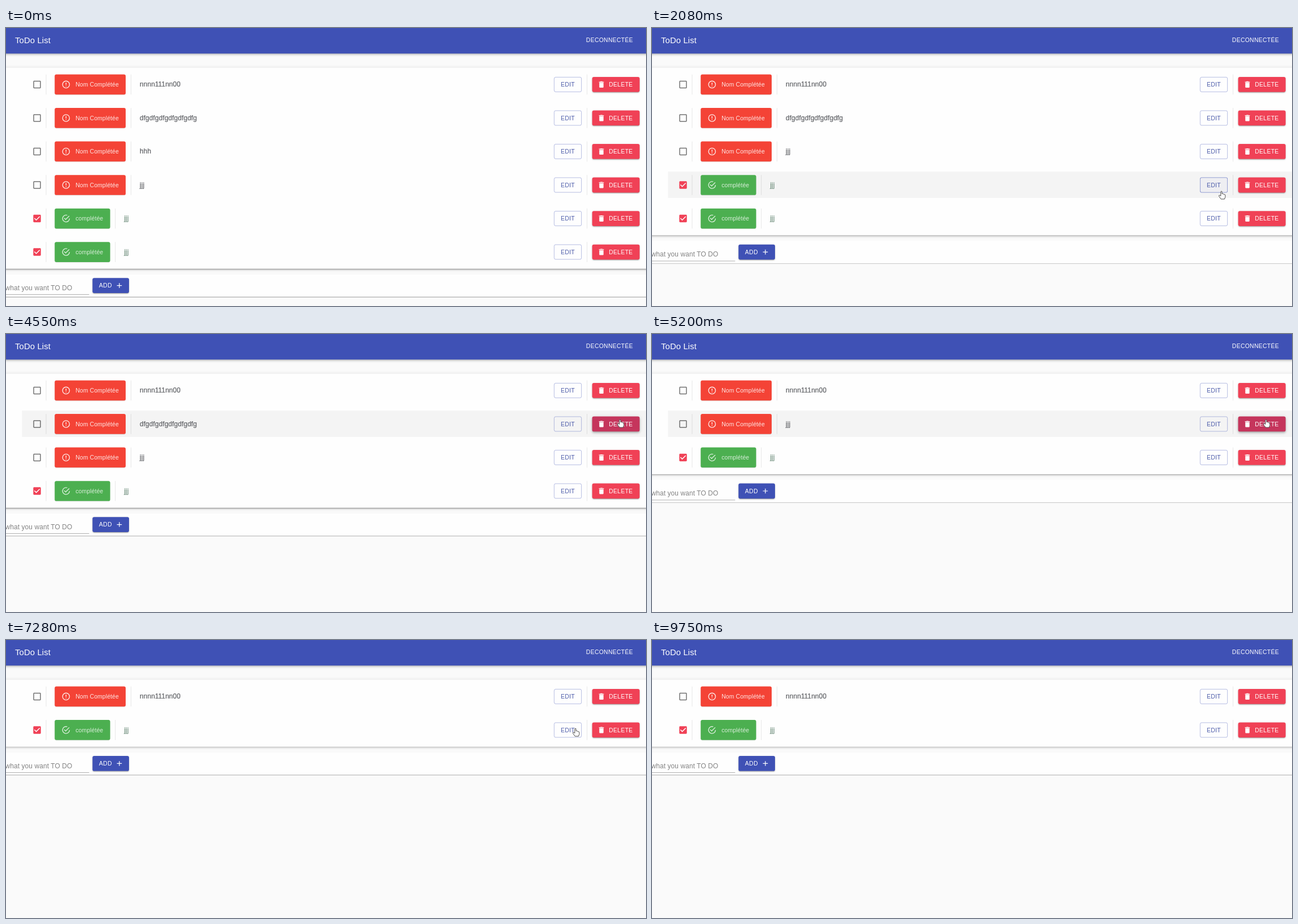
Recreate the animation shown at these times as an HTML page. Size 1134 by 494 pixels, loop 9.88 s.

```html
<!DOCTYPE html>
<html lang="fr">
<head>
<meta charset="utf-8">
<title>ToDo List</title>
<style>
  html, body { margin: 0; width: 100%; height: 100%; overflow: hidden; background: #fafafa; }
  #stage { position: relative; width: 1134px; height: 494px; overflow: hidden; background: #fafafa; }
  #page {
    position: absolute; left: 0; top: 0; width: 1525px; height: 664px;
    transform: scale(.744); transform-origin: 0 0;
    font: 16px "Liberation Sans", Arial, sans-serif; letter-spacing: .15px;
  }
  #page * { box-sizing: border-box; white-space: nowrap; }
  svg { display: block; fill: currentColor; flex: none; }
  header {
    position: absolute; left: -10px; right: -10px; top: -3.5px; height: 64px; z-index: 2;
    background: #3f51b5; color: #fff; line-height: 64px;
    box-shadow: 0 2px 4px -1px #0003, 0 4px 5px #00000024, 0 1px 10px #0000001f;
  }
  header * { position: absolute; top: 0; }
  header b { left: 31.5px; font-size: 20px; font-weight: 400; }
  header span { left: 1391.5px; font-size: 14px; letter-spacing: .4px; }
  main { position: absolute; top: 94.8px; left: 0; width: 1525px; }
  .paper { position: relative; margin: 0 -10px; padding: 0 10px; background: #fefefe; }
  #list { box-shadow: 0 3px 3px -2px #0004, 0 3px 4px #0000002b, 0 1px 8px #0000001f; }
  .row { position: relative; height: 80px; }
  .row > * { position: absolute; }
  .band { left: 37.6px; right: -10px; top: 8.3px; height: 63.2px; overflow: hidden; }
  .hover .back { background: #0000000a; }
  .ripple { position: absolute; border-radius: 50%; background: #0000001a; transform: translate(-50%, -50%); }
  .check { left: 61.9px; top: 28px; color: #0000008f; }
  .done .check { color: #f04156; }
  .rule { width: 1px; height: 48px; top: 16px; background: #0000001f; }
  .tag {
    left: 115.6px; top: 16px; height: 48px; padding: 0 16px; display: flex; align-items: center; gap: 12px;
    border-radius: 4px; background: #f44336; color: #ffffffde; font-size: 14px;
    box-shadow: 0 1px 1px #0002;
  }
  .done .tag { background: #4caf50; color: #ffffffc8; }
  .tag + .rule { left: 297.4px; }
  .done .tag + .rule { left: 260.4px; }
  .label { left: 318.5px; top: 0; line-height: 79px; color: #5f6165; -webkit-text-stroke: .3px #5f6165; }
  .done .label { left: 281.2px; color: #71907f; -webkit-text-stroke-color: #71907f; }
  .btn {
    position: absolute; display: flex; align-items: center; gap: 8px; height: 36px; padding: 0 16px;
    border-radius: 4px; color: #fff; font-size: 14px; letter-spacing: .4px;
    box-shadow: 0 3px 1px -2px #0003, 0 2px 2px #00000024, 0 1px 5px #0000001f;
  }
  .row .btn { top: 22.3px; }
  .edit { left: 1305.1px; color: #4c5ba9; border: 1px solid #3f51b580; padding: 0 15px; box-shadow: none; }
  .edit.over { background: #3f51b508; border-color: #3f51b5b0; }
  .del { left: 1395.8px; padding-left: 12px; background: #f04156; }
  .del.over { background: #c5355c; box-shadow: 0 2px 4px -1px #0003, 0 4px 5px #00000024, 0 1px 10px #0000001f; }
  #form { margin-top: 13.4px; height: 53.7px; box-shadow: 0 2px 1px -1px #0004, 0 1px 1px #0003, 0 1px 3px #0000001f; }
  #form .hint { position: absolute; left: 8px; top: 24px; color: #0000007c; }
  #form .line { position: absolute; left: 0; top: 47.8px; width: 207.6px; height: 1px; background: #0000006b; }
  #form .btn { left: 215.6px; top: 8.9px; padding-right: 13px; background: #3f51b5; }
  #cursor { position: absolute; left: 0; top: 0; overflow: visible; fill: #fff; stroke: #4a4a4a; }
</style>
</head>
<body>
<div id="stage">
  <div id="page">
    <header><b>ToDo List</b><span>DECONNECTÉE</span></header>
    <main>
      <div class="paper" id="list"></div>
      <div class="paper" id="form">
        <span class="hint">what you want TO DO</span><i class="line"></i>
        <span class="btn" id="add">ADD</span>
      </div>
    </main>
  </div>
  <svg id="cursor" width="16" height="18" stroke-linejoin="round">
    <path id="hand" d="M-2.2 1.5V-6.2Q-1.1 -8 0 -6.2V-2.4Q1.4 -3.2 2 -1.9Q3.3 -2.4 3.9 -1.2Q5.8 -1.5 5.8 .5V3.4L4.4 7H-1.8L-5.6 1.6Q-5.6 -.4 -3.8 .3Z"/>
    <path id="arrow" d="M-4 -7V5L-1.2 2.4L.7 6.8L2.5 6L.7 1.7H4.4Z"/>
  </svg>
</div>
<script>
const LOOP = 9880, STEP = 130, SCALE = .744;
const LIST_TOP = 70.5, PITCH = 59.5;
const HOVER_FROM = 1690, HOVER_TO = 7150;

const icons = {
  box: "M19 5v14H5V5h14m0-2H5c-1.1 0-2 .9-2 2v14c0 1.1.9 2 2 2h14c1.1 0 2-.9 2-2V5c0-1.1-.9-2-2-2z",
  ticked: "M19 3H5c-1.11 0-2 .9-2 2v14c0 1.1.89 2 2 2h14c1.11 0 2-.9 2-2V5c0-1.1-.89-2-2-2zm-9 14l-5-5 1.41-1.41L10 14.17l7.59-7.59L19 8l-9 9z",
  error: "M11 15h2v2h-2zm0-8h2v6h-2zm1-5a10 10 0 1 0 0 20a10 10 0 1 0 0-20zm0 18a8 8 0 1 1 0-16a8 8 0 1 1 0 16z",
  success: "M20 12A8 8 0 1 1 14.2 4.31L15.77 2.74A10 10 0 1 0 22 12M7.91 10.08L6.5 11.5L11 16L21 6L19.59 4.58L11 13.17Z",
  trash: "M6 19c0 1.1.9 2 2 2h8c1.1 0 2-.9 2-2V7H6v12zM19 4h-3.5l-1-1h-5l-1 1H5v2h14V4z",
  plus: "M19 13h-6v6h-2v-6H5v-2h6V5h2v6h6v2z"
};
const icon = (name, size, cls = "") =>
  `<svg class="${cls}" width="${size}" height="${size}" viewBox="0 0 24 24"><path d="${icons[name]}"/></svg>`;

// click: when DELETE is pressed, until: when the row goes
const items = [
  { text: "nnnn111nn00" },
  { text: "dfgdfgdfgdfgdfgdfg", click: 4810, until: 5200 },
  { text: "hhh", click: 1690, until: 1950 },
  { text: "jjj", click: 6760, until: 7150 },
  { text: "jjj", done: true, click: 3183, until: 3510 },
  { text: "jjj", done: true }
];

// time, x, y of the pointer's centre
const path = [
  [1170, 1100, 400], [1560, 1087, 224], [1820, 1087, 224], [2080, 1010, 297], [2470, 1012, 292],
  [2860, 1086, 281], [3640, 1086, 281], [4290, 1089, 159], [5460, 1089, 159], [6110, 1020, 155],
  [6500, 1086, 160], [6890, 1086, 160], [7280, 1010, 164], [7800, 1004, 200], [8840, 985, 400]
];

const $ = id => document.getElementById(id);
const smooth = p => p * p * (3 - 2 * p);

$("add").innerHTML += icon("plus", 20);
for (const item of items) {
  const row = item.el = document.createElement("div");
  row.className = "row" + (item.done ? " done" : "");
  row.innerHTML = `
    <div class="band back"></div>
    ${icon(item.done ? "ticked" : "box", 24, "check")}
    <i class="rule" style="left:95.4px"></i>
    <div class="tag">${icon(item.done ? "success" : "error", 22)}${item.done ? "complétée" : "Nom Complétée"}</div>
    <i class="rule"></i>
    <span class="label">${item.text}</span>
    <span class="btn edit">EDIT</span>
    <i class="rule" style="left:1383.3px"></i>
    <span class="btn del">${icon("trash", 20)}DELETE</span>
    <div class="band"><i class="ripple"></i></div>`;
  item.edit = row.querySelector(".edit");
  item.del = row.querySelector(".del");
  item.ripple = row.querySelector(".ripple");
  $("list").append(row);
}

function pointerAt(t) {
  const next = path.findIndex(key => key[0] > t);
  if (next < 1) return null;
  const [t0, x0, y0] = path[next - 1], [t1, x1, y1] = path[next];
  const p = smooth((t - t0) / (t1 - t0));
  return { x: x0 + (x1 - x0) * p, y: y0 + (y1 - y0) * p };
}

function drawRipple(item, t, pointer, mid) {
  const active = pointer && t > item.click && t < item.until;
  item.ripple.style.display = active ? "" : "none";
  if (!active) return;
  const size = 2 * 1060 * smooth(Math.min(1, (t - item.click) / 550)) / SCALE;
  Object.assign(item.ripple.style, {
    width: size + "px", height: size + "px",
    left: (pointer.x - 2) / SCALE - 37.6 + "px",
    top: 31.6 + (pointer.y - 2 - mid) / SCALE + "px"
  });
}

function draw(t) {
  const pointer = pointerAt(t);
  const tip = pointer && { x: pointer.x - 1, y: pointer.y - 7 };
  const live = tip && t >= HOVER_FROM && t < HOVER_TO;
  let index = 0;
  for (const item of items) {
    const shown = !(t >= item.until);
    item.el.style.display = shown ? "" : "none";
    if (!shown) continue;
    const mid = LIST_TOP + PITCH * (index++ + .5);
    const dy = live ? Math.abs(tip.y - mid) : Infinity;
    const over = (left, right) => dy < 13.6 && tip.x > left && tip.x < right;
    item.el.classList.toggle("hover", dy < 23.5);
    item.edit.classList.toggle("over", over(971, 1020));
    item.del.classList.toggle("over", over(1038, 1123));
    drawRipple(item, t, pointer, mid);
  }
  $("cursor").style.display = pointer ? "" : "none";
  if (!pointer) return;
  const inList = tip.y < LIST_TOP + PITCH * index;
  $("cursor").style.transform = `translate(${pointer.x}px, ${pointer.y}px)`;
  $("hand").style.display = inList ? "" : "none";
  $("arrow").style.display = inList ? "none" : "";
}

const start = performance.now();
function tick(now) {
  const t = Math.max(0, now - start) % LOOP;
  draw(Math.floor(t / STEP) * STEP);
  requestAnimationFrame(tick);
}
draw(0);
requestAnimationFrame(tick);
</script>
</body>
</html>
```
